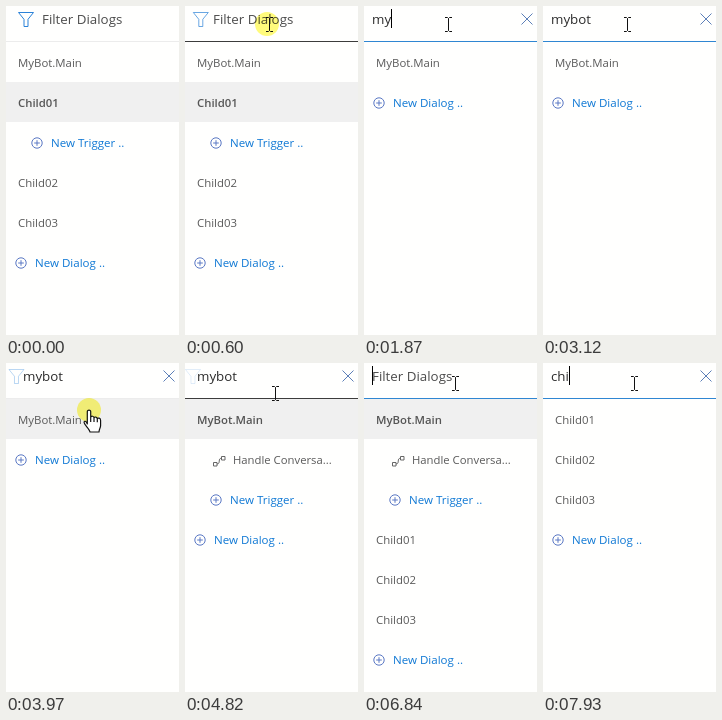
An HTML page that plays this animation: 173x329 px, repeating every 8 s.

```html
<!DOCTYPE html>
<html lang="en">
<head>
<meta charset="utf-8">
<title>Dialog filter</title>
<style>
  html, body { margin: 0; width: 100%; height: 100%; overflow: hidden; background: #fffffe; }
  body { position: relative; font-family: "Open Sans", "Noto Sans", sans-serif; }
  svg { position: absolute; left: 0; top: 0; overflow: visible; fill: none; }
  .search {
    position: absolute; left: 0; top: 0; width: 100%; height: 35px;
    border-bottom: 1px solid #ececec; font-size: 13.33px; line-height: 26px;
  }
  .search.hover { border-color: #3c3c3c; }
  .search.focus { border-color: #2f86d2; }
  #query { position: absolute; left: 0; top: 0; white-space: pre; color: #2b2b2b; }
  #query.empty { color: #4c4c4c; }
  #caret { position: absolute; top: 3px; width: 1px; height: 19px; background: #000; }
  #list { position: absolute; left: 0; top: 36px; width: 100%; }
  .row {
    position: relative; height: 39px; padding: 1px 0 0 12px;
    font-size: 11.4px; line-height: 40px; white-space: pre; color: #5a5a5a;
  }
  .row.hover, .row.selected { background: #f0f0f0; }
  .row.selected { font-size: 11.35px; font-weight: 600; color: #555; }
  .row.trigger { padding-left: 48px; font-size: 11.3px; }
  .row.add { padding-left: 29px; font-size: 11.55px; color: #0f78d4; }
  .row.add.nested { padding-left: 45px; }
  .add svg { left: 14.5px; top: 20.5px; stroke: #5a78c4; }
  .add.nested svg { left: 30.5px; }
  .trigger svg { left: 28px; top: 16px; stroke: #666; }
  #funnel { stroke: #2b82d8; }
  #clear { left: 163px; top: 13px; stroke: #5c7fb8; }
  #spot {
    position: absolute; left: -12px; top: -12px; width: 24px; height: 24px;
    border-radius: 50%; background: #fffb7c; mix-blend-mode: multiply;
  }
</style>
</head>
<body>
<div class="search" id="search">
  <svg id="funnel" width="1" height="1"><path d="M-7.5-6.5h15L2 .3V7.5H-2V.3Z"/></svg>
  <span id="query"></span>
  <i id="caret"></i>
  <svg id="clear" width="1" height="1"><path d="M-5.5-5.5l11 11M5.5-5.5l-11 11"/></svg>
</div>
<div id="list"></div>
<div id="spot"></div>
<svg id="beam" width="1" height="1">
  <path d="M-3.5-7h2.5l1 1 1-1H3.5M0-6V6M-3.5 7h2.5l1-1 1 1H3.5" stroke="#111"/>
</svg>
<svg id="hand" width="1" height="1">
  <path d="M-1.7 14V1.6C-1.7-.3 1.7-.3 1.7 1.6V7.5C2 5.5 5 6 5 8C5.5 6.4 8.2 6.8 8.3 8.8C9 7.4 11.6 8 11.6 10.4V15.5C11.6 18 10 19 10 22H1C1 19.5-4.6 15-4.9 12.5C-5 10.5-2.8 10.8-1.7 14ZM5 8v4M8.3 8.8v3.5M1.7 7.5V12"
    fill="#fff" stroke="#111" stroke-width="1.2" stroke-linejoin="round"/>
</svg>
<script>
const LOOP = 8000;
const $ = id => document.getElementById(id);

// Tracks hold each value from its time until the next one.
const typed = [
  [0, ""], [1620, "m"], [1870, "my"], [2110, "myb"], [2410, "mybo"], [2570, "mybot"],
  [6210, "mybo"], [6440, "myb"], [6520, "my"], [6690, "m"], [6840, ""],
  [7700, "c"], [7850, "ch"], [7930, "chi"]
];
const caretOn = [
  [0, 0], [680, 1], [1160, 0], [1620, 1], [3120, 0], [3580, 1], [3890, 0],
  [5200, 1], [5750, 0], [6210, 1], [7300, 0], [7700, 1]
];
// Funnel visibility: 1 at rest, 0 while the field has focus.
const rest = [
  [0, 1], [600, .7], [680, .14], [760, 0], [3970, .32], [4050, .8], [4130, 1],
  [4750, .6], [4820, .14], [4900, 0]
];
const edge = [
  [0, ""], [450, "hover"], [840, "focus"], [3890, ""], [4750, "hover"], [5200, "focus"]
];
const spotOn = [[0, 0], [600, 1], [840, 0], [3890, 1], [4200, 0], [4970, 1], [5450, 0]];
const moves = [
  { from: [185, 236], to: [84, 18], start: 70, end: 450, steps: 6 },
  { from: [84, 18], to: [83, 47], start: 3580, end: 3890, steps: 5 },
  { from: [83, 47], to: [90, 30], start: 4680, end: 4820, steps: 3 },
  { from: [90, 30], to: [91, 20], start: 4900, end: 4970, steps: 2 }
];

const hold = (track, t) => track.filter(k => k[0] <= t).pop()[1];

function pointer(t) {
  const m = moves.filter(m => m.start <= t).pop();
  if (!m) return null;
  const done = Math.floor((t - m.start) / (m.end - m.start) * (m.steps - 1) + .1) + 1;
  const p = Math.min(1, done / m.steps);
  return m.from.map((v, i) => Math.round(v + (m.to[i] - v) * p));
}

const plus = '<svg width="1" height="1"><circle r="5.2"/><path d="M-2.8 0H2.8M0-2.8V2.8"/></svg>';
const link = '<svg width="1" height="1"><path d="M.5 7.5h3.5v3.5h-3.5zM8.5 1.5h3.5v3.5h-3.5zM4 9C8 9 4.5 3.2 8.5 3.2"/></svg>';
const row = (kind, text, icon = "") => `<div class="row ${kind}">${icon}${text}</div>`;
const dialogs = ["MyBot.Main", "Child01", "Child02", "Child03"];

function listHtml(query, selected) {
  const rows = [];
  for (const name of dialogs) {
    if (!name.toLowerCase().includes(query)) continue;
    const open = name === selected;
    rows.push(row(open ? "dialog selected" : "dialog", name));
    if (!open) continue;
    if (name === dialogs[0]) rows.push(row("trigger", "Handle Conversa...", link));
    rows.push(row("add nested", "New Trigger ..", plus));
  }
  rows.push(row("add", "New Dialog ..", plus));
  return rows.join("");
}

const place = (el, x, y) => el.style.transform = `translate(${x}px, ${y}px)`;
const show = (el, on) => el.style.display = on ? "block" : "none";
let shown = "";

function draw(t) {
  const text = hold(typed, t), p = hold(rest, t), pos = pointer(t);

  const html = listHtml(text, dialogs[t < 4200 ? 1 : 0]);
  if (html !== shown) $("list").innerHTML = shown = html;
  const under = pos ? Math.floor((pos[1] - 36) / 40) : -1;
  [...$("list").children].forEach((el, i) =>
    el.classList.toggle("hover", i === under && el.classList.contains("dialog")));

  $("search").className = "search " + hold(edge, t);
  const left = Math.round(8 + 28 * p);
  $("query").textContent = text || "Filter Dialogs";
  $("query").className = text ? "" : "empty";
  place($("query"), left, 0);
  place($("funnel"), 6 + 14 * p, 13);
  $("funnel").style.opacity = p;
  const width = text ? $("query").offsetWidth : 0;
  place($("caret"), left + width, 0);
  show($("caret"), hold(caretOn, t));
  show($("clear"), text);

  const onList = under >= 0;
  show($("beam"), pos && !onList);
  show($("hand"), onList);
  show($("spot"), hold(spotOn, t));
  if (!pos) return;
  place($("beam"), pos[0] + .5, pos[1] + .5);
  place($("hand"), ...pos);
  place($("spot"), pos[0] - (onList ? 0 : 2), pos[1]);
}

const began = performance.now();
function tick() {
  draw((performance.now() - began) % LOOP);
  requestAnimationFrame(tick);
}
tick();
</script>
</body>
</html>
```
